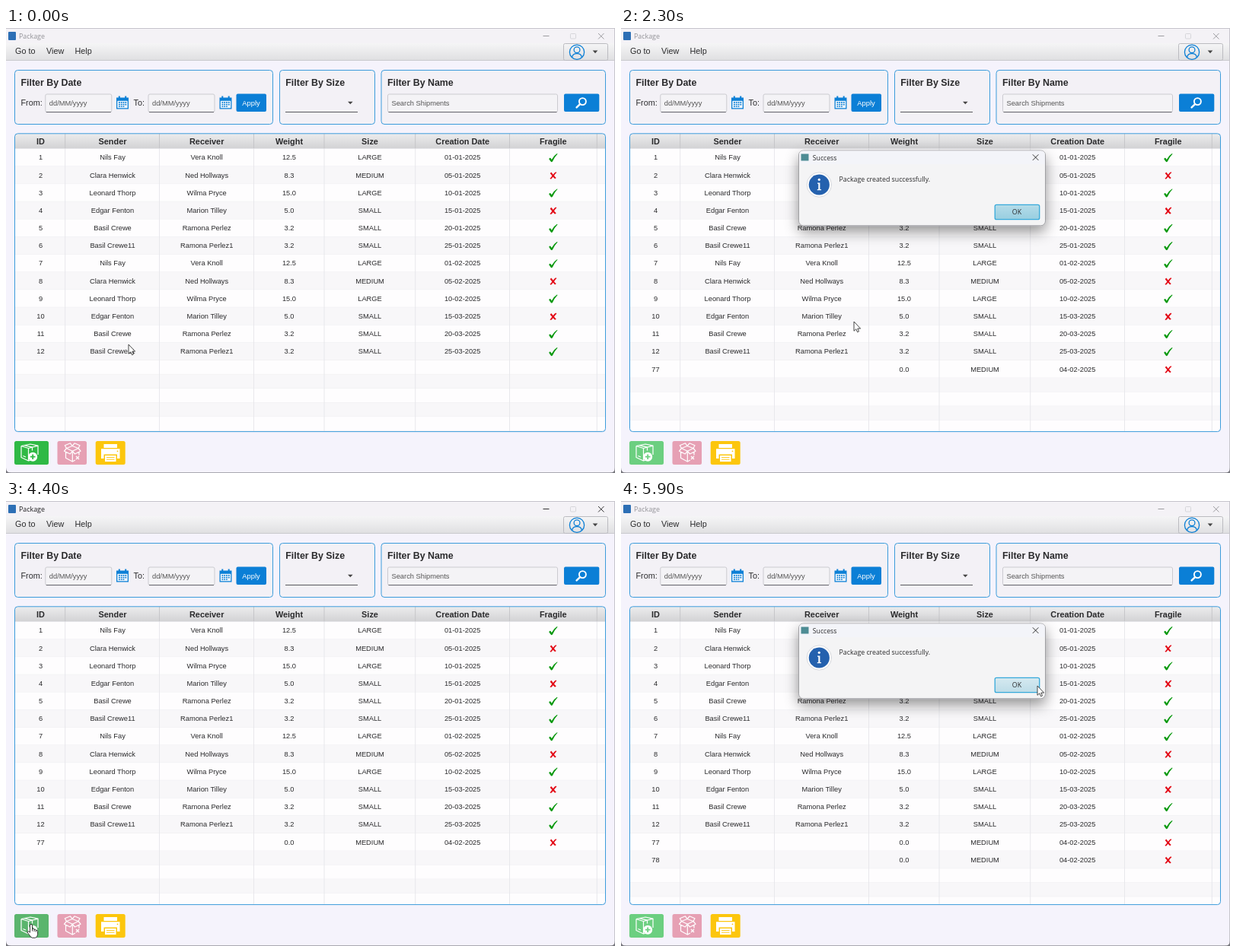
Recreate the animation shown at these times as an HTML page. Size 800 px wide and 585 px high, loop 6000 ms.

```html
<!DOCTYPE html>
<html lang="en">
<head>
<meta charset="utf-8">
<title>Package</title>
<style>
html, body { margin: 0; width: 100%; height: 100%; overflow: hidden; background: #f5f3fc; }
svg { display: block; width: 800px; height: 585px; }
text { font-family: "Liberation Sans", Arial, sans-serif; fill: #2a2a2c; white-space: pre; }
.ui { font-family: "Open Sans", "Noto Sans", sans-serif; }
.cell { font-size: 9.3px; text-anchor: middle; }
.head { font-size: 10.9px; font-weight: bold; text-anchor: middle; }
.title { font-size: 12.4px; font-weight: bold; }
.menu { font-size: 10.8px; }
.field { font-size: 9.3px; fill: #555; }
</style>
</head>
<body>
<svg id="stage" viewBox="0 0 800 585" xmlns="http://www.w3.org/2000/svg">
  <defs>
    <linearGradient id="bar" x2="0" y2="1"><stop stop-color="#f5f5f6"/><stop offset="1" stop-color="#dfdfe1"/></linearGradient>
    <linearGradient id="headFill" x2="0" y2="1"><stop stop-color="#ececed"/><stop offset="1" stop-color="#d2d2d4"/></linearGradient>
    <linearGradient id="okFill" x2="0" y2="1"><stop stop-color="#b5dce9"/><stop offset="1" stop-color="#98cee0"/></linearGradient>
    <linearGradient id="okHover" x2="0" y2="1"><stop stop-color="#d5e9f0"/><stop offset="1" stop-color="#bddce7"/></linearGradient>
    <filter id="shadow" x="-20%" y="-40%" width="140%" height="200%">
      <feDropShadow dx="0" dy="8" stdDeviation="9" flood-color="#000" flood-opacity=".42"/>
    </filter>
    <clipPath id="tableClip"><rect x="12" y="139" width="775" height="391" rx="4"/></clipPath>
    <path id="yes" d="M-5.6 1.2Q-4.2-.8-3.3.4L-2 2.3Q1-3.2 5-5.6L5.8-5.2Q1.7-1-.9 4.8Q-2.1 6.1-3.1 4.9Q-4.2 3.6-5.6 1.2Z" fill="#0a990f"/>
    <path id="no" d="M-2.6-4.4Q-1.2-2.8-.1-1.2Q1.7-3.8 3.4-4.7L4.6-3.9Q2.6-2.2 1.2.2Q2.5 2 4 3.1L2.3 4.5Q1 3.3-.2 1.9Q-1.4 3.7-2.9 4.8L-4.4 3.9Q-2.5 2.4-1.5.3Q-2.8-1.3-4.1-2.6Z" fill="#e30b17"/>
    <g id="cal">
      <path d="M0 2H16V17H0Z" fill="#0c80d6"/>
      <path d="M1.3 6.3H14.7V15.7H1.3Z" fill="#f5f8fc"/>
      <path d="M3.8 0V4M12.2 0V4" stroke="#0c80d6" stroke-width="2"/>
      <path d="M3 8.4H13.2M3 11.1H13.2M3 13.8H10.3" stroke="#0c80d6" stroke-width="1.6" stroke-dasharray="1.8 1"/>
    </g>
  </defs>

  <rect width="800" height="585" fill="#f5f3fc"/>
  <rect width="800" height="20" fill="#f4f2f6"/>
  <rect x="3" y="5" width="10" height="11" rx="1" fill="#2d6fb5"/>
  <g id="caption">
    <text class="ui" x="17" y="14" font-size="8.9">Package</text>
    <path d="M705.5 10.5H713.5M778 7L785.5 14.5M785.5 7L778 14.5" fill="none" stroke-width=".9"/>
  </g>
  <rect x="741.5" y="7.5" width="7" height="6.5" rx="1" fill="none" stroke="#cfcfd3" stroke-width=".8"/>

  <rect y="20" width="800" height="23" fill="url(#bar)"/>
  <path d="M0 42.5H800" stroke="#c9c9cd"/>
  <g class="menu"><text x="12" y="34">Go to</text><text x="53" y="34">View</text><text x="90.5" y="34">Help</text></g>
  <rect x="732.5" y="20.5" width="58" height="22" rx="2" fill="url(#bar)" stroke="#bbbbc0"/>
  <g fill="none" stroke="#0c7fd5" stroke-width="1.3">
    <circle cx="750" cy="31.7" r="9.6"/><circle cx="750" cy="28.8" r="3.9"/>
    <path d="M743.6 38.6Q744.4 33.7 750 33.7T756.4 38.6"/>
  </g>
  <path d="M770.7 29.6H777.3L774 33.2Z" fill="#444"/>

  <g fill="#f3f1f6" stroke="#3c9cdb">
    <rect x="11.5" y="55.5" width="339" height="71" rx="4"/>
    <rect x="359.5" y="55.5" width="125" height="71" rx="4"/>
    <rect x="493" y="55.5" width="294.5" height="71" rx="4"/>
  </g>
  <g class="title"><text x="19.5" y="76">Filter By Date</text><text x="367.3" y="76">Filter By Size</text><text x="501" y="76">Filter By Name</text></g>
  <g class="menu"><text x="19.5" y="102">From:</text><text x="167.5" y="102">To:</text></g>
  <g id="fields"></g>
  <use href="#cal" x="145" y="89.5"/><use href="#cal" x="280.5" y="89.5"/>
  <g fill="#0b7fd6"><rect x="302.5" y="86.5" width="39.5" height="23.5" rx="2"/><rect x="733" y="86.5" width="46.3" height="23.5" rx="2"/></g>
  <text x="322" y="102" font-size="9.4" text-anchor="middle" style="fill:#fff">Apply</text>
  <path d="M367 110.5H462" stroke="#58585c"/>
  <path d="M449 96.8H455.6L452.3 100.3Z" fill="#444"/>
  <circle cx="757.4" cy="96.6" r="4.5" fill="none" stroke="#fff" stroke-width="1.9"/>
  <path d="M754 100.2L749.6 104.3" stroke="#fff" stroke-width="2.5" stroke-linecap="round"/>

  <g id="table" clip-path="url(#tableClip)"></g>
  <rect x="11.5" y="138.8" width="776" height="391.8" rx="4" fill="none" stroke="#3c9cdb"/>

  <rect id="add" x="11" y="543" width="45" height="31" rx="2.5"/>
  <rect x="67.5" y="543" width="38.5" height="31" rx="2.5" fill="#e6a0b4"/>
  <rect x="117.7" y="543" width="39" height="31" rx="2.5" fill="#fcc60d"/>
  <g fill="none" stroke="#fff" stroke-width="1.2" stroke-linejoin="round">
    <path d="M20 549.5L32 547L42 549.2V561M20 549.5L29.5 552.5L42 549.2M20 549.5V564.5L29.5 569V552.5M24.5 548.6L34.5 551.2V555.5M29.5 569L32 568.2M22.4 562.5L26 564"/>
    <path d="M79.5 552.5L87 549.5L95 552.5L87.3 556.2ZM79.5 552.5L76.5 556.2L84.3 560L87.3 556.2L90.5 560L98 556.2L95 552.5M79.5 552.5L77.3 548.8L84.5 545.8L87 549.5L90 545.8L97 548.8L95 552.5M78.5 557.5V565.2L87.3 570V556.2M96 557.5V561.5M87.3 570L91 568"/>
    <path d="M92 563L96 567M96 563L92 567" stroke-width="1.4"/>
  </g>
  <circle cx="35.2" cy="563.7" r="6" fill="#fff"/>
  <path id="plus" d="M35.2 560.4V567M31.9 563.7H38.5" stroke-width="1.8"/>
  <path d="M128.5 547H146V552H128.5ZM125 553.3H149.5V566H146V560.5H128.5V566H125ZM130 562H144.5V570H130Z" fill="#fff"/>
  <path d="M132 564.5H142.5M132 567.2H142.5" stroke="#fcc60d" stroke-width=".9"/>
  <circle cx="146.5" cy="556.3" r=".9" fill="#fcc60d"/>
  <path d="M0 .5H800M799.5 0V585" stroke="#c6c5cc"/>
  <path d="M0 584.5H800" stroke="#aaa9b0"/>
  <path d="M0 578Q0 585 7 585H0ZM800 578Q800 585 793 585H800Z" fill="#77777d"/>

  <g id="dialog">
    <rect x="233.5" y="161" width="324" height="98.8" rx="6" fill="#f4f4f5" stroke="#8f8f94" stroke-width=".8" filter="url(#shadow)"/>
    <path d="M234 179V167Q234 161.4 239.5 161.4H551.5Q557 161.4 557 167V179Z" fill="#f3f4f9"/>
    <rect x="236.5" y="165.5" width="10" height="9" fill="#4d8c94"/>
    <text class="ui" x="251.8" y="173.6" font-size="8.7">Success</text>
    <path d="M540.8 166.3L548.4 173.9M548.4 166.3L540.8 173.9" stroke="#333"/>
    <circle cx="260.3" cy="206" r="16.2" fill="#fff" stroke="#cfd0d5" stroke-width=".8"/>
    <circle cx="260.3" cy="206" r="13.6" fill="#2461ae"/>
    <circle cx="260.3" cy="199.3" r="1.6" fill="#fff"/>
    <path d="M258 203.4H261.4V212H263V213.3H257.8V212H259.3V204.7H258Z" fill="#fff"/>
    <text class="ui" x="286.5" y="202" font-size="8.8">Package created successfully.</text>
    <rect id="ok" x="491.2" y="232.3" width="58.5" height="19.4" rx="2" stroke="#35a9da" stroke-width="1.3"/>
    <text class="ui" x="520" y="245.3" font-size="8.8" text-anchor="middle">OK</text>
  </g>

  <path id="arrow" d="M0 0V12.3L2.8 9.8L4.6 13.8L6.5 12.9L4.8 9.1H8.6Z" fill="#fff" stroke="#333" stroke-width=".9" stroke-linejoin="round"/>
  <path id="hand" d="M-1.5 8V1Q-1.5-.6 0-.6T1.5 1V5.3Q3.7 4.7 4 6.2Q6 5.7 6.4 7.2Q8.6 6.9 8.6 8.8V12.5Q8.4 16.5 5.5 17.2H1.5Q-.8 16.6-2.2 13.7L-5 9.9Q-4.6 7.6-2.6 9.2L-1.5 10.2ZM1.5 5.3V8.5M4 6.2V9M6.4 7.2V9.5" fill="#fff" stroke="#222" stroke-width=".9" stroke-linejoin="round"/>
</svg>
<script>
const LOOP = 6000, STEP = 100;
const $ = id => document.getElementById(id);
const show = (el, on) => el.setAttribute('display', on ? 'inline' : 'none');
const between = (t, a, b) => t >= a && t < b;

function field(x, w, label) {
  return `<rect x="${x}" y="87" width="${w}" height="23.5" rx="2" fill="#f4f3f6" stroke="#cbcbd0"/>
    <path d="M${x + 1} 110.6H${x + w - 1}" stroke="#626267"/>
    <text class="field" x="${x + 5}" y="102">${label}</text>`;
}
$('fields').innerHTML = field(51.8, 87, 'dd/MM/yyyy') + field(187, 87, 'dd/MM/yyyy') +
  field(501.5, 223, 'Search Shipments');

const heads = ['ID', 'Sender', 'Receiver', 'Weight', 'Size', 'Creation Date', 'Fragile'];
const mids = [45.5, 140, 263.7, 372, 478, 599.7, 718.8];
const lines = [77.7, 201.5, 325.5, 418, 537.7, 661.5, 776.3];
const TOP = 158.7, ROW = 23.18, GAP = 18.55;

const people = [
  ['Nils Fay', 'Vera Knoll', '12.5', 'LARGE', 1],
  ['Clara Henwick', 'Ned Hollways', '8.3', 'MEDIUM', 0],
  ['Leonard Thorp', 'Wilma Pryce', '15.0', 'LARGE', 1],
  ['Edgar Fenton', 'Marion Tilley', '5.0', 'SMALL', 0],
  ['Basil Crewe', 'Ramona Perlez', '3.2', 'SMALL', 1],
  ['Basil Crewe11', 'Ramona Perlez1', '3.2', 'SMALL', 1]
];
const days = ['01', '05', '10', '15', '20', '25'];
const rows = Array.from({ length: 12 }, (_, i) => {
  const [from, to, weight, size, fragile] = people[i % 6];
  const month = i < 6 ? '01' : i < 9 ? '02' : '03';
  return [i + 1, from, to, weight, size, `${days[i % 6]}-${month}-2025`, fragile];
});
for (const id of [77, 78]) rows.push([id, '', '', '0.0', 'MEDIUM', '04-02-2025', 0]);

function band(y, h, i) {
  return `<rect x="12" y="${y}" width="775" height="${h}" fill="${i % 2 ? '#f8f7f9' : '#fefdfe'}"/>
    <path d="M12 ${y + h}H787" stroke="#ececef" stroke-width=".8"/>`;
}

function drawTable(count) {
  let s = '', y = TOP;
  for (let i = 0; i < count; i++, y += ROW) {
    const mid = y + ROW / 2;
    s += band(y, ROW, i);
    rows[i].forEach((v, c) => {
      s += c < 6 ? `<text class="cell" x="${mids[c]}" y="${mid + 3.1}">${v}</text>`
        : `<use href="#${v ? 'yes' : 'no'}" x="${mids[c]}" y="${mid + .4}"/>`;
    });
  }
  for (let i = count; y < 530; i++, y += GAP) s += band(y, GAP, i);
  s += `<rect x="12" y="139" width="775" height="19.5" fill="url(#headFill)"/>`;
  for (const x of lines)
    s += `<path d="M${x} 139V158.5" stroke="#c3c3c7" stroke-width=".9"/><path d="M${x} 158.5V530" stroke="#e6e6ea" stroke-width=".9"/>`;
  heads.forEach((h, c) => s += `<text class="head" x="${mids[c]}" y="153.3">${h}</text>`);
  $('table').innerHTML = s;
}

// time, x, y of the pointer tip
const path = [
  [0, 161, 416], [500, 158, 418], [1100, 118, 432], [1500, 33, 557], [1900, 33, 557],
  [2300, 306, 386], [2800, 513, 237], [3400, 513, 237], [3700, 112, 478],
  [4000, 33, 557], [5400, 33, 557], [5900, 547, 243], [6000, 547, 243]
];

function pointer(t) {
  const k = path.findIndex(p => p[0] > t);
  const [t0, x0, y0] = path[k - 1], [t1, x1, y1] = path[k];
  const u = (t - t0) / (t1 - t0), e = u * u * (3 - 2 * u);
  return [x0 + (x1 - x0) * e, y0 + (y1 - y0) * e];
}

let shown = 0;
function render(t) {
  const second = t >= 5300;
  const open = between(t, 1800, 3500) || second;
  const active = between(t, 1600, 1800) || between(t, 3500, 5300);
  const [x, y] = pointer(t);
  const onAdd = !open && x >= 11 && x <= 56 && y >= 543 && y <= 574;
  const onOk = open && x >= 491 && x <= 550 && y >= 232 && y <= 252;

  const count = second ? 14 : t >= 1800 ? 13 : 12;
  if (count !== shown) drawTable(shown = count);

  const ink = active ? '#1d1d1f' : '#929297';
  $('caption').querySelector('text').style.fill = ink;
  $('caption').querySelector('path').setAttribute('stroke', ink);

  const green = open ? '#6ccf80' : onAdd ? '#5bb56d' : '#2fb945';
  $('add').setAttribute('fill', green);
  $('plus').setAttribute('stroke', green);

  show($('dialog'), open);
  $('ok').setAttribute('fill', onOk && second ? 'url(#okHover)' : 'url(#okFill)');

  show($('hand'), onAdd);
  show($('arrow'), !onAdd);
  $(onAdd ? 'hand' : 'arrow').setAttribute('transform', `translate(${x.toFixed(2)} ${y.toFixed(2)})`);
}

const start = performance.now();
function tick() {
  const t = (performance.now() - start) % LOOP;
  render(Math.floor(t / STEP) * STEP);
  requestAnimationFrame(tick);
}
render(0);
requestAnimationFrame(tick);
</script>
</body>
</html>
```
